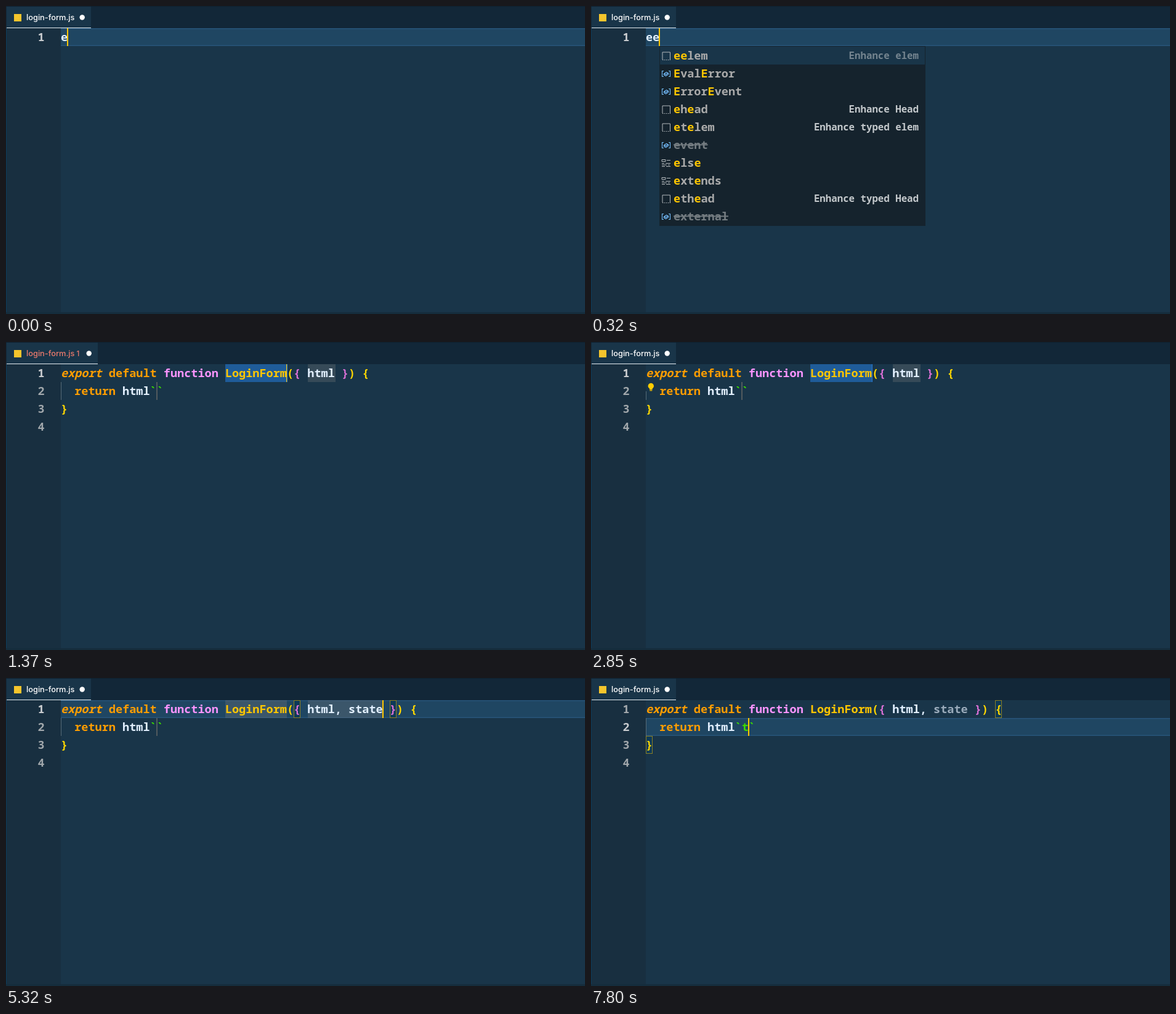
Animation, 940 px wide and 500 px high, one loop 8 s. Source, as an HTML page:

```html
<!DOCTYPE html>
<html lang="en">
<head>
<meta charset="utf-8">
<title>Typing a component</title>
<style>
  html, body { margin: 0; width: 100%; height: 100%; overflow: hidden; background: #193549; }
  svg { display: block; width: 940px; height: 500px; }
  text { white-space: pre; font: 600 18.55px "Noto Sans Mono", "DejaVu Sans Mono", monospace; fill: #e1efff; }
  .tab { font: 500 12.8px Inter, "Open Sans", sans-serif; fill: #fff; }
  .error { fill: #ec7a6c; }
  .detail { font-size: 15.75px; fill: #c3c8cb; text-anchor: end; }
  .list { fill: #aaa; }
  .number { fill: #a2a8ac; text-anchor: end; }
  .active { fill: #c9cccf; }
  .dim { fill: #79858d; }
  .old { fill: #747c81; text-decoration: line-through; }
  .keyword { fill: #ff9d00; }
  .italic { fill: #ff9d00; font-style: italic; }
  .storage { fill: #fb94ff; }
  .name { fill: #ffc600; }
  .gold { fill: #ffd700; }
  .orchid { fill: #da70d6; }
  .paren { fill: #ffee80; }
  .string { fill: #3ad900; }
  .unused { fill: #9aabbb; }
</style>
</head>
<body>
<svg id="stage" viewBox="0 0 940 500"></svg>
<script>
const LOOP = 8000, LEFT = 89, TOP = 36, LINE = 29, PITCH = 11.13;
const stage = document.getElementById('stage');

const colX = col => LEFT + col * PITCH;
const lineY = line => TOP + (line - 1) * LINE;
const rect = (x, y, w, h, fill, extra = '') =>
  `<rect x="${x}" y="${y}" width="${w}" height="${h}" fill="${fill}" ${extra}/>`;
const path = (d, stroke, extra = '') => `<path d="${d}" fill="none" stroke="${stroke}" ${extra}/>`;
const text = (x, y, body, cls = '') => `<text x="${x}" y="${y}" class="${cls}">${body}</text>`;
const run = (cls, body) => `<tspan class="${cls}">${body}</tspan>`;

// Editor decorations, placed by line and column
const block = (line, from, to, fill) =>
  rect(Math.round(colX(from)), lineY(line), Math.round((to - from) * PITCH), LINE, fill);
const placeholder = (line, from, to) => block(line, from, to, 'rgba(124,124,124,.3)');
const selection = (line, from, to) =>
  block(line, from, to, '#1f5c99') + rect(Math.round(colX(to)), lineY(line), 1, LINE, '#2878cc');
const bracketBox = (line, col) =>
  rect(Math.floor(colX(col)) + .5, lineY(line) + .5, 10, LINE - 1, '#0d3a58', 'stroke="#8c8024"');
const cursor = (line, col, width = 2) =>
  rect(Math.round(colX(col) - .9), lineY(line), width, LINE, '#ffc600');
const lineHighlight = line =>
  rect(LEFT, lineY(line), 851, LINE, '#1f4662') +
  rect(LEFT, lineY(line), 851, 1.5, '#28557a') +
  rect(LEFT, lineY(line) + LINE - 1.5, 851, 1.5, '#28557a');
const numbers = (count, active) => Array.from({ length: count }, (_, i) =>
  text(62.5, lineY(i + 1) + 21, i + 1, i + 1 === active ? 'number active' : 'number')).join('');
const bulb = (x, y) =>
  `<circle cx="${x}" cy="${y}" r="4.7" fill="#ffcc00"/>` +
  rect(x - 2.3, y + 3, 4.6, 3, '#ffcc00') + rect(x - 2, y + 6.5, 4, 1.5, '#d8ae08');

function chrome(error) {
  const right = error ? 149 : 138;
  return rect(0, 0, 940, 500, '#193549') +
    rect(0, 36, LEFT, 464, '#182f40') +
    rect(0, 0, 940, 36, '#122738') +
    rect(0, 0, 940, 1, '#0f202e') +
    rect(1, 1, right - 1, 34, '#193549') +
    rect(1, 35, right - 1, 1, '#e6edf2') +
    rect(0, 36, 1, 464, '#0d3a58') +
    rect(0, 497, 940, 3, '#152d3d') +
    rect(13, 13, 12, 12, '#f5c52c') +
    text(33, 23, 'login-form.js', error ? 'tab error' : 'tab') +
    (error ? `<text x="114.5" y="23" class="tab error" style="font-size:11.5px">1</text>` : '') +
    `<circle cx="${right - 14.3}" cy="18.5" r="4.2" fill="#fff"/>`;
}

// Completion icons, centred on x, y
const icons = {
  keyword: (x, y) => path(
    `M${x - 7} ${y - 5.5}h6v3h-6zM${x + 1} ${y - 4.5}h6M${x - 7} ${y + .5}h4m2 0h8M${x - 7} ${y + 3}h8m2 0h3M${x - 7} ${y + 5.5}h5m2 0h7`,
    '#b4b9bc'),
  method: (x, y) => path(
    `M${x} ${y - 6.5}l6 3v7l-6 3.5l-6 -3.5v-7zM${x - 6} ${y - 3.5}l6 3.3l6 -3.3M${x} ${y}v7`,
    '#b180d7', 'stroke-width="1.2"'),
  snippet: (x, y) =>
    path(`M${x - 6} ${y + 6}v-12h12.5v12`, '#b4b9bc') +
    path(`M${x - 6} ${y + 6.5}h13`, '#b4b9bc', 'stroke-dasharray="1.5 1.5"'),
  variable: (x, y) => path(
    `M${x - 4} ${y - 4.5}h-2.5v9h2.5M${x + 4} ${y - 4.5}h2.5v9h-2.5M${x - 3.5} ${y}l4 -2.5l3 1.5v2l-4 2.5l-3 -1.5zl3 1.3l4 -2.5`,
    '#75beff', 'stroke-width="1.1"'),
};

const firstList = [
  ['keyword', 'else'], ['method', 'encodeURI'], ['method', 'encodeURIComponent'],
  ['method', 'eval'], ['keyword', 'export'], ['keyword', 'extends'],
  ['snippet', 'eapi', 'Enhance API'], ['snippet', 'eelem', 'Enhance elem'],
  ['snippet', 'ehead', 'Enhance Head'], ['snippet', 'error', 'Log error to console'],
];
const secondList = [
  ['snippet', 'eelem', 'Enhance elem'], ['variable', 'EvalError'], ['variable', 'ErrorEvent'],
  ['snippet', 'ehead', 'Enhance Head'], ['snippet', 'etelem', 'Enhance typed elem'],
  ['variable', 'event'], ['keyword', 'else'], ['keyword', 'extends'],
  ['snippet', 'ethead', 'Enhance typed Head'], ['variable', 'external'],
];
const deprecated = ['event', 'external'];

function matched(word, count) {
  let left = count;
  return [...word].map(c => c === word[0] && left-- > 0 ? run('name', c) : c).join('');
}

function popup(x, items, typed) {
  const rows = items.map(([icon, word, detail], i) => {
    const y = 66 + i * LINE, old = deprecated.includes(word);
    return icons[icon](x + 11, y + 15) +
      text(x + 23, y + 21, old ? word : matched(word, typed), old ? 'old' : 'list') +
      (detail ? `<text x="${x + 421}" y="${y + 20}" class="detail"${i ? '' : ' style="fill:#74848f"'}>${detail}</text>` : '');
  });
  return rect(x, 65, 432, 292, '#15232d') + rect(x + 1, 66, 430, LINE, '#193549') +
    (typed === 1 ? rect(x + 421, 67, 10, 20, '#1c3a4f') : '') + rows.join('');
}

function docs() {
  return rect(543, 65, 331, 171, '#15232d') + rect(543, 225, 260, 11, '#1a2b38') +
    `<svg x="543" y="65" width="330" height="171" viewBox="543 65 330 171">` +
    text(548, 91, 'Export Enhance element (Enh', 'dim') +
    text(548, 120, 'ance.dev Snippets)', 'dim') +
    text(548, 165, run('italic', 'export') + run('keyword', ' default ') +
      run('storage', 'function ') + run('paren', '(') + '{ html }') +
    text(548, 194, run('keyword', '    return ') + run('name', 'html') + run('string', '``')) +
    text(548, 222, '}') + '</svg>' +
    path('M852.5 75l8 8m0 -8l-8 8', '#a9b2b8');
}

function typingScene(t) {
  const count = t < 320 ? 1 : 2, error = t >= 730;
  return chrome(error) + lineHighlight(1) + numbers(1, 1) +
    text(LEFT, 57, 'e'.repeat(count)) +
    (error ? path('M89 64l2.75 -2.5l2.75 2.5l2.75 -2.5l2.75 2.5l2.75 -2.5l2.75 2.5l2.75 -2.5l2.75 2.5', '#e0393e') : '') +
    (t < 810 || t >= 1290 ? cursor(1, count) : '') +
    (t >= 970 ? bulb(119.5, 42.3) : '') +
    (t >= 320 ? popup(111, secondList, 2) : t >= 160 ? popup(100, firstList, 1) : '') +
    (t >= 400 ? docs() : '');
}

const typeTimes = [4590, 4670, 4750, 4910, 4990, 5240, 5320];

function componentScene(t) {
  const args = ', state'.slice(0, typeTimes.filter(time => t >= time).length);
  const end = 40 + args.length;
  const inTemplate = t >= 5730, moved = t >= 4100, nextStop = t >= 3600;
  const showBulb = t >= 1610 && t < 4430;
  const typedT = t >= 7800 ? 't' : '';
  let back = '', front = '';

  if (inTemplate) {
    back = lineHighlight(2) + bracketBox(1, 51) + bracketBox(3, 0);
    const hidden = t >= 6140 && t < 6640 || t >= 7140 && t < 7640;
    if (!hidden) front = cursor(2, 14 + typedT.length);
  } else if (moved) {
    back = lineHighlight(1) + placeholder(1, 24, 33) + placeholder(1, 36, end);
    if (t >= 4180) back += bracketBox(1, 34) + bracketBox(1, end + 1);
    if (t >= 4430 && t < 4590) back += placeholder(1, 36, 40) + placeholder(2, 9, 13);
    front = cursor(1, end);
  } else if (nextStop) {
    back = placeholder(1, 24, 33) + selection(1, 36, 40) + placeholder(2, 9, 13);
    front = cursor(1, 40, 1);
  } else {
    back = selection(1, 24, 33) + placeholder(1, 36, 40);
    const hidden = t >= 1850 && t < 2350 || t >= 2850 && t < 3350;
    if (!hidden) front = cursor(1, 33, 1);
  }
  if (!inTemplate) back += rect(244, 65, 2, LINE, '#525a5e');

  const guideTop = showBulb ? 80 : 65;
  const argRun = inTemplate ? ', ' + run('unused', 'state') : args;
  return chrome(t < 1770) + back + numbers(4, inTemplate ? 2 : 1) +
    rect(LEFT, guideTop, 1, 94 - guideTop, '#566b78') +
    text(LEFT, 57, run('italic', 'export') + run('keyword', ' default ') + run('storage', 'function ') +
      run('name', 'LoginForm') + run('gold', '(') + run('orchid', '{') + ' html' + argRun +
      run('orchid', ' }') + run('gold', ') {')) +
    text(LEFT, 86, run('keyword', '  return ') + 'html' + run('string', '`' + typedT + '`')) +
    text(LEFT, 115, '}', 'gold') +
    (showBulb ? bulb(97.3, 71.5) : '') + front;
}

let shown = '';
function draw() {
  const t = performance.now() % LOOP;
  const scene = t < 1370 ? typingScene(t) : componentScene(t);
  if (scene !== shown) stage.innerHTML = shown = scene;
  requestAnimationFrame(draw);
}
draw();
</script>
</body>
</html>
```
